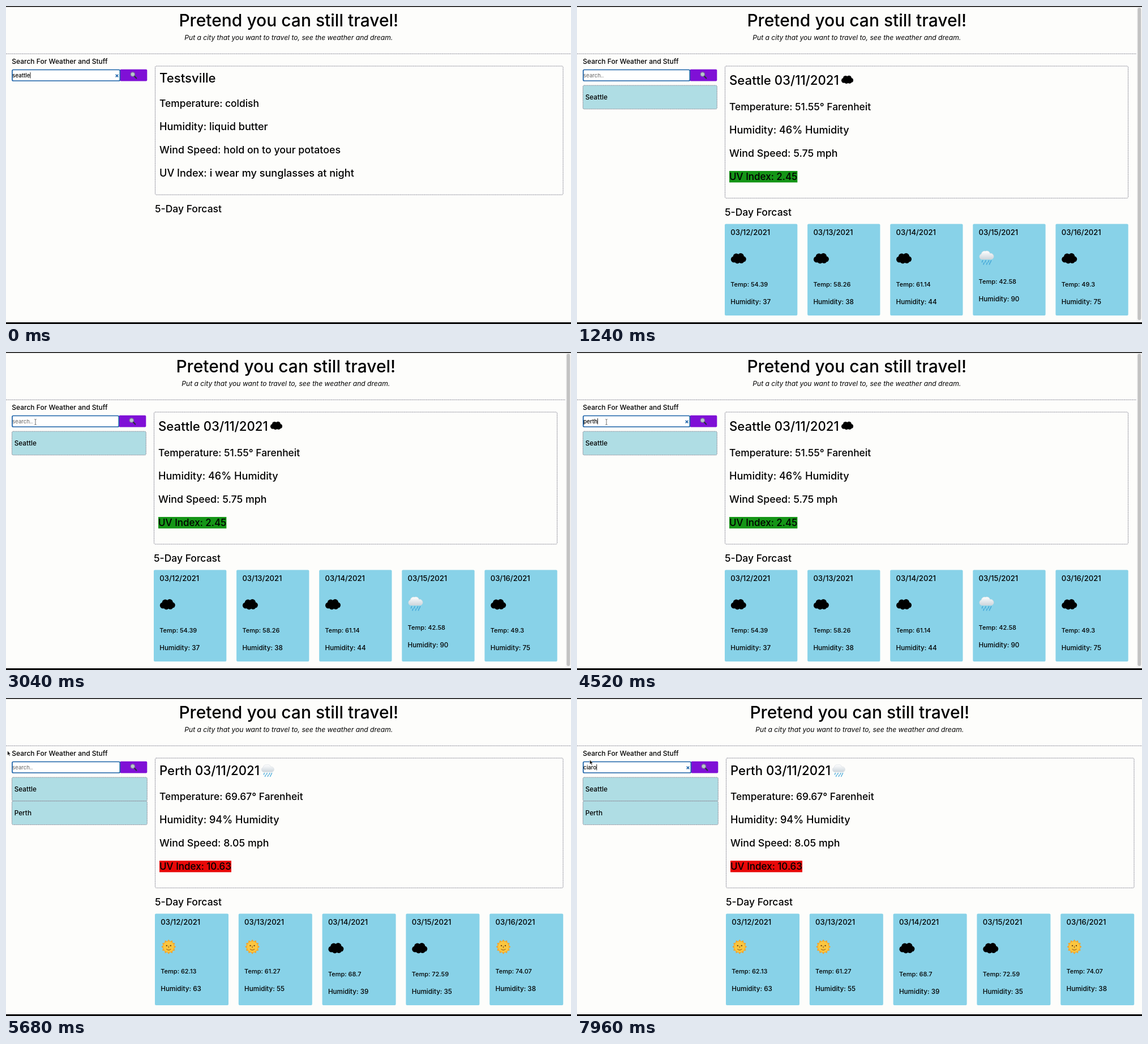
An HTML page for the animation above (8 s loop, 998 by 561 pixels).

```html
<!DOCTYPE html>
<html lang="en">
<head>
<meta charset="utf-8">
<title>Weather search</title>
<style>
html, body { margin: 0; width: 100%; height: 100%; overflow: hidden; background: #fdfdfb; }
svg { display: block; width: 100vw; height: 100vh; }
text { font-family: Inter, "Open Sans", sans-serif; font-weight: 450; font-optical-sizing: none; white-space: pre; }
</style>
</head>
<body>
<svg viewBox="0 0 998 561">
  <defs>
    <g id="cloud">
      <circle cx="-8" cy="2" r="5.500"/><circle cx="-4" cy="-3" r="5.600"/>
      <circle cx="3.800" cy="-3.300" r="5.700"/><circle cx="8.500" cy="1.500" r="5"/>
      <circle cx="-2" cy="4" r="5.300"/><circle cx="5" cy="4.200" r="4.800"/>
    </g>
    <linearGradient id="fog" x2="0" y2="1">
      <stop offset="0" stop-color="#fff"/><stop offset="1" stop-color="#ccd5dc"/>
    </linearGradient>
    <g id="rain">
      <path d="M-9 4a5 5 0 0 1-.5-9.5A6 6 0 0 1-2-10.500a6 6 0 0 1 8 4A5.400 5.400 0 0 1 8.500 4Z" fill="url(#fog)" stroke="#d3dade" stroke-width=".6"/>
      <path d="M-7 6l-1.200 3M-1.500 6l-1.200 3M4 6l-1.200 3M8 6l-1.200 3M-4.500 10l-1.200 3M1 10l-1.200 3M6 10l-1.200 3" stroke="#45a8d8" stroke-width="1.500" stroke-linecap="round"/>
    </g>
    <g id="sun"></g>
    <g id="lens" stroke-linecap="round">
      <path d="M1.500 1.500L5 5.200" stroke="#26323c" stroke-width="2.200"/>
      <circle cx="-1.500" cy="-1.800" r="3.700" fill="#b9c6cf" stroke="#7b7f92" stroke-width="1.200"/>
    </g>
  </defs>
  <g id="page"></g>
  <path id="beam" d="M-1.800-5Q0-5 0-3.500Q0-5 1.800-5M0-3.500V3.500M-1.800 5Q0 5 0 3.500Q0 5 1.800 5" fill="none" stroke="#666" stroke-width=".9"/>
  <path id="arrow" d="M0 0V8.200L1.900 6.500L3.200 9.400L4.600 8.800L3.300 6H5.800Z" fill="#111" stroke="#fff" stroke-width=".6"/>
  <rect width="998" height="1.500"/>
  <rect y="558" width="998" height="3"/>
</svg>
<script>
const LOOP = 8000;
const $ = id => document.getElementById(id);

const demo = {
  name: 'Testsville', shift: 0, titleY: 135.2, cards: [],
  rows: ['coldish', 'liquid butter', 'hold on to your potatoes']
};
const seattle = {
  name: 'Seattle 03/11/2021', icon: 'cloud', iconX: 216, shift: 6, titleY: 138.5, narrow: true,
  rows: ['51.55° Farenheit', '46% Humidity', '5.75 mph'],
  cards: [['cloud', 54.39, 37], ['cloud', 58.26, 38], ['cloud', 61.14, 44], ['rain', 42.58, 90], ['cloud', 49.3, 75]]
};
const perth = {
  name: 'Perth 03/11/2021', icon: 'rain', iconX: 199, shift: 2, titleY: 135.8,
  rows: ['69.67° Farenheit', '94% Humidity', '8.05 mph'],
  cards: [['sun', 62.13, 63], ['sun', 61.27, 55], ['cloud', 68.7, 39], ['cloud', 72.59, 35], ['sun', 74.07, 38]]
};
const labels = ['Temperature: ', 'Humidity: ', 'Wind Speed: '];
const rowSizes = [17.4, 18.1, 17.8];

const LOADED = [480, 4840], UV_READY = [920, 5160];

function typed(t) {
  if (t < LOADED[0]) return 'seattle';
  if (t < LOADED[1]) return typing('perth', t, 3560, 200);
  return typing('ciaro', t, 6960, 220);
}
const typing = (word, t, start, step) => word.slice(0, Math.max(0, Math.floor((t - start) / step) + 1));

const text = (x, y, size, s, extra = '') => `<text x="${x}" y="${y}" font-size="${size}" ${extra}>${s}</text>`;
const rect = (x, y, w, h, fill, extra = '') => `<rect x="${x}" y="${y}" width="${w}" height="${h}" fill="${fill}" ${extra}/>`;
const icon = (id, x, y, scale = 1) => `<use href="#${id}" transform="translate(${x} ${y}) scale(${scale})"/>`;
const dotted = 'stroke="#8e8e9b" stroke-dasharray="2 .8" rx="2"';

function sidebar(inputEnd, value, cities) {
  let out = text(10.3, 101.8, 12, 'Search For Weather and Stuff')
    + rect(inputEnd, 111.8, 48, 20.7, '#7f10d6', 'rx="2"')
    + rect(11, 112.5, inputEnd - 11, 19.5, '#fff', 'stroke="#1b62a8" stroke-width="1.7" rx="2"')
    + icon('lens', inputEnd + 24, 122.3);
  if (value) {
    const x = inputEnd - 5.3;
    out += text(11.3, 125.7, 9.7, value, 'id="typed"')
      + '<path id="caret" stroke="#000" stroke-width=".9"/>'
      + `<path d="M${x - 2.3} 120.800l4.600 4.600m0-4.600l-4.600 4.600" stroke="#1b62a8" stroke-width="1.500"/>`;
  } else out += text(11.3, 125.7, 9.4, 'search..', 'fill="#777"');
  cities.forEach((city, i) => {
    const y = 140 + i * 41.8;
    out += rect(10.5, y, inputEnd + 37.5, 41.8, '#afdde4', dotted) + text(14.7, y + 24.7, 11.8, city);
  });
  return out;
}

function card([kind, temp, humidity], date, x, y, w) {
  const lift = kind === 'cloud' ? 0 : 4.8;
  return rect(x, y, w, 161.5, '#88d2e8', 'rx="2"')
    + text(x + 10.3, y + 19.6, 13.1, date)
    + icon(kind, x + 24.3, y + (lift ? 58.3 : 60.5))
    + text(x + 10.3, y + 110.5 - lift, 11, 'Temp: ' + temp)
    + text(x + 10.3, y + 141.1 - lift, 11.7, 'Humidity: ' + humidity);
}

function draw(city, uv, value, cities) {
  const { narrow, shift } = city;
  const width = narrow ? 988 : 998;
  const left = narrow ? 261.5 : 263.5, boxW = narrow ? 712 : 720.5;
  const cardW = narrow ? 128.3 : 130, gap = narrow ? 146.1 : 147.8;
  const mid = narrow ? 494.3 : 499.3, tx = left + 7.5;
  const uvY = 301.3 + shift;

  let out = rect(0, 0, 998, 561, '#fdfdfb')
    + text(mid, 36.3, 30, 'Pretend you can still travel!', 'text-anchor="middle"')
    + text(mid, 60.4, 12.1, 'Put a city that you want to travel to, see the weather and dream.', 'text-anchor="middle" font-style="italic"')
    + `<path d="M0 84.300H${width}" ${dotted}/>`
    + sidebar(narrow ? 199.3 : 201.3, value, cities)
    + rect(left, 106, boxW, 227 + shift, 'none', dotted)
    + text(tx, city.titleY, 22.2, city.name);
  if (city.icon) out += icon(city.icon, left + city.iconX, city.titleY - 8.7, city.icon === 'cloud' ? .78 : .88);
  city.rows.forEach((row, i) => out += text(tx, 177.7 + shift + i * 41.2, rowSizes[i], labels[i] + row));
  if (uv) {
    out += rect(tx, uvY - 16.3, 119, 20.3, uv > 8 ? '#e80808' : '#149516', 'id="mark"')
      + text(tx, uvY, 17, 'UV Index: ' + uv, 'id="uv"');
  } else out += text(tx, uvY, 18.1, 'UV Index: i wear my sunglasses at night');

  out += text(left - .5, 364 + shift, 17.5, '5-Day Forcast');
  city.cards.forEach((c, i) => {
    out += card(c, `03/${12 + i}/2021`, left - .5 + i * gap, 378.6 + shift, cardW);
  });
  if (narrow) out += rect(988.5, 1, 9.5, 557, '#f6f6f6') + rect(990.3, 3, 6, 551, '#c3c3c3', 'rx="3"');

  $('page').innerHTML = out;
  if (uv) $('mark').setAttribute('width', $('uv').getComputedTextLength());
  if (value) $('caret').setAttribute('d', `M${11.8 + $('typed').getComputedTextLength()} 117v10.500`);
}

function drawSun() {
  let rays = '';
  for (let i = 0; i < 24; i++) {
    const a = i * Math.PI / 12, r = i % 2 ? 10 : 13;
    rays += `${(r * Math.cos(a)).toFixed(1)},${(r * Math.sin(a)).toFixed(1)} `;
  }
  $('sun').innerHTML = `<polygon points="${rays}" fill="#f2a52c"/>
    <circle r="9.600" fill="#fbc63f"/>
    <circle cx="-3.500" cy="-2" r="1.200" fill="#6b451c"/><circle cx="3.500" cy="-2" r="1.200" fill="#6b451c"/>
    <path d="M0-1.500V2M-4 4Q0 7.500 4 4" fill="none" stroke="#9a611d" stroke-width="1.100"/>`;
}

const ease = p => p * p * (3 - 2 * p);
function glide(t, t0, t1, from, to) {
  const p = ease(Math.min(1, Math.max(0, (t - t0) / (t1 - t0))));
  return from.map((v, i) => v + (to[i] - v) * p);
}
function place(id, visible, [x, y]) {
  $(id).setAttribute('visibility', visible ? 'visible' : 'hidden');
  $(id).setAttribute('transform', `translate(${x} ${y})`);
}

function moveMouse(t) {
  const away = t >= 5160;
  const enter = glide(t, 2240, 2640, [-4, 62], [52, 123.5]);
  const leave = t < 5920
    ? glide(t, 5160, 5560, [52, 123.5], [2.5, 93])
    : glide(t, 6080, 6480, [2.5, 93], [22.5, 109]);
  const pos = away ? leave : enter;
  const overInput = pos[0] > 10 && pos[1] > 112 && pos[1] < 132;
  place('beam', t >= 2240 && overInput, pos);
  place('arrow', t >= 2240 && !overInput, pos);
}

let shown = '';
function update(t) {
  const step = LOADED.filter(x => t >= x).length;
  const uv = [0, 2.45, 10.63][UV_READY.filter(x => t >= x).length];
  const value = typed(t);
  const key = [step, uv, value].join();
  if (key !== shown) {
    shown = key;
    draw([demo, seattle, perth][step], uv, value, ['Seattle', 'Perth'].slice(0, step));
  }
  moveMouse(t);
}

drawSun();
const start = performance.now();
function tick() {
  update((performance.now() - start) % LOOP);
  requestAnimationFrame(tick);
}
tick();
</script>
</body>
</html>
```
